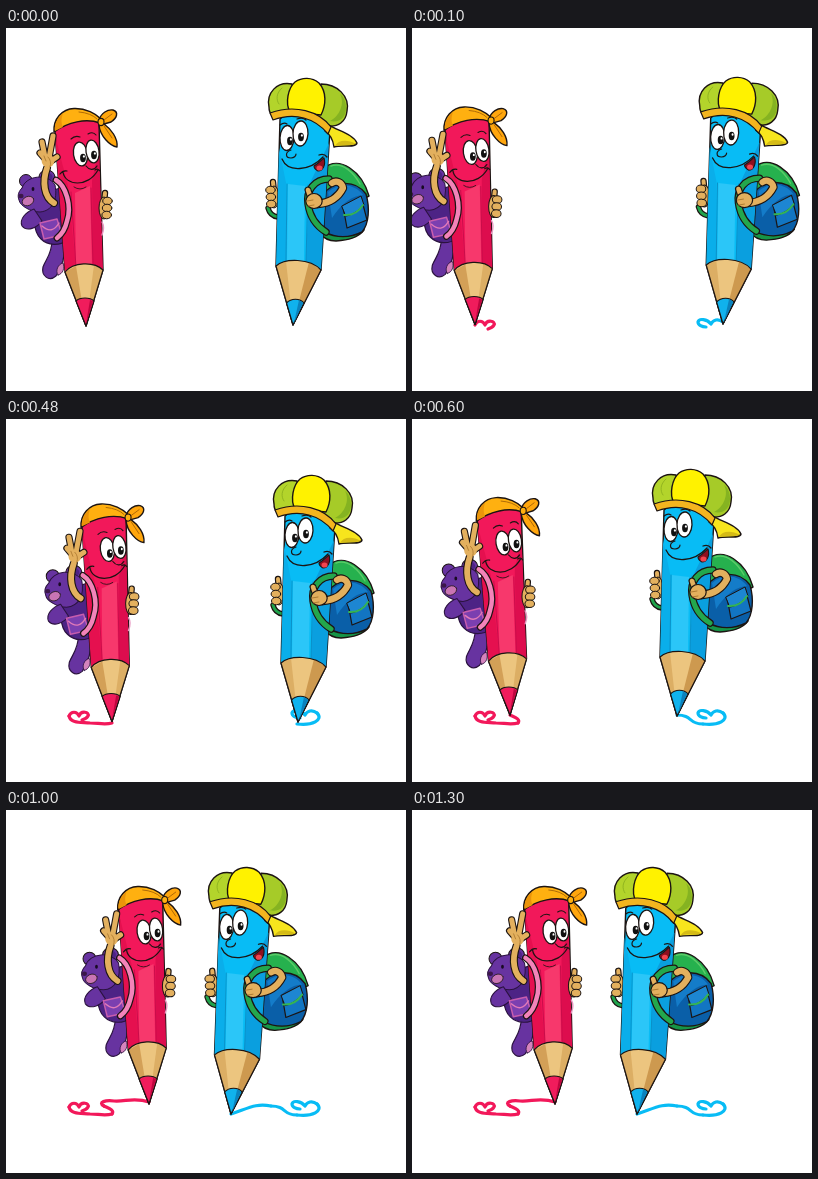
Recreate the animation shown at these times as an HTML page with a canvas. Size 400 by 363 pixels, loop 1500 ms.

```html
<!DOCTYPE html>
<html lang="en">
<head>
<meta charset="utf-8">
<title>Two pencils</title>
<style>
html, body { margin: 0; width: 100%; height: 100%; overflow: hidden; background: #fff; }
canvas { display: block; width: 400px; height: 363px; }
</style>
</head>
<body>
<canvas id="stage"></canvas>
<script>
const W = 400, H = 363, LOOP = 1500;
const canvas = document.getElementById('stage');
const ctx = canvas.getContext('2d');
const ratio = window.devicePixelRatio || 1;
canvas.width = W * ratio;
canvas.height = H * ratio;
ctx.lineCap = ctx.lineJoin = 'round';

const INK = '#1c1412', SKIN = '#e3b05e', SKIN_DARK = '#a9762d';
const PINK = '#f2185a', BLUE = '#08bcf5';

// start time, then dx, dy and tilt in degrees about the tip
const poses = [
  { at: 0, pink: [0, 0, 0], blue: [0, 0, 0] },
  { at: 100, pink: [-17, -1.5, 0.3], blue: [24, -1, 0.2] },
  { at: 300, pink: [26, 4.5, 0.3], blue: [5, 6, 0] },
  { at: 600, pink: [18, -2, -0.5], blue: [-22, 0, 0] },
  { at: 1000, pink: [63, -4, 0.2], blue: [-62, 7, 0.5] }
];

// one piece of line is added with every pose
const pinkTrail = [
  'M63 297C65 292 71 292 73 297C75 291 84 293 82 297C81 299 79 300 76 301',
  'M63 297C65 305 76 303 84 304C92 304 99 306 106 304',
  'M106 304C109 300 102 298 98 296',
  'M98 296C91 292 100 290 108 291C119 292 128 287 143 292'
];
const blueTrail = [
  'M311 294C306 290 301 292 299 296C295 291 287 290 286 294C286 297 290 299 294 299',
  'M311 294C318 301 306 307 291 305',
  'M291 305C276 305 281 296 265 296',
  'M265 296C250 293 243 298 225 304'
];

function shape(d, fill, line = 1.4, ink = INK) {
  const p = new Path2D(d);
  if (fill) { ctx.fillStyle = fill; ctx.fill(p); }
  if (line) { ctx.strokeStyle = ink; ctx.lineWidth = line; ctx.stroke(p); }
}

function line(d, width = 1.2, ink = INK) {
  shape(d, null, width, ink);
}

function oval(x, y, rx, ry, fill, width = 1.2, tilt = 0) {
  ctx.beginPath();
  ctx.ellipse(x, y, rx, ry, tilt, 0, Math.PI * 2);
  ctx.fillStyle = fill;
  ctx.fill();
  if (width) { ctx.strokeStyle = INK; ctx.lineWidth = width; ctx.stroke(); }
}

// outlined thick stroke
function limb(d, width, fill) {
  line(d, width + 2.4);
  line(d, width, fill);
}

function eye(x, y, rx, ry, px, py, tilt) {
  oval(x, y, rx, ry, '#fff', 1.3, tilt);
  oval(px, py, 2.9, 4.2, '#111', 0);
  oval(px + 0.9, py - 1.6, 1, 1.2, '#fff', 0);
}

// thumb-up fist, side = 1 or -1
function fist(x, y, side) {
  limb(`M${x - side * 2} ${y - 2}L${x - side} ${y - 12}`, 4, SKIN);
  oval(x - side * 2, y + 3, 5, 11, SKIN, 1);
  for (let i = 0; i < 3; i++) oval(x + side * (1.5 - i * 0.4), y - 4 + i * 7, 4.8, 3.8, SKIN, 1);
}

function teddy() {
  const fur = '#6733a0', dark = '#4d2385', ink = '#2b123f';
  shape('M46 212C46 226 40 231 37 239C35 248 43 254 50 248C55 241 59 229 60 212Z', fur, 1.2, ink);
  shape('M52 247C49 243 52 236 57 235C59 240 57 246 52 247Z', '#d583bd', 0.8, ink);
  shape('M30 168C26 184 27 204 35 211C42 218 54 218 61 212L60 158Z', dark, 1.2, ink);
  oval(20, 153, 6.5, 6.5, fur, 1);
  oval(41, 149, 8, 7, fur, 1);
  oval(42, 149, 4.5, 4, dark, 0);
  shape('M16 160C20 147 42 145 49 157C52 172 46 183 34 184C25 184 14 178 13 172C11 167 13 163 16 160Z', fur, 1, ink);
  shape('M28 181C20 184 13 191 16 198C21 204 31 200 36 193Z', fur, 1.1, ink);
  oval(22, 173, 6, 4.5, '#c974b4', 0.8, -0.4);
  oval(15, 168, 2.6, 2.2, '#3b1749', 0);
  oval(27, 161, 1.4, 2, '#180a22', 0);
  shape('M34 195L51 191L56 207L38 211Z', '#7b3fb0', 1.5, '#c85dae');
  line('M36 198Q46 207 53 195', 1.4, '#e27ab8');
}

function pinkPencil() {
  teddy();
  const wood = 'M59 244C67 234 88 233 97 242L80 298Z';
  shape('M49 104C52 92 88 88 93 95L97 242L80 298L59 244Z', PINK);
  shape('M49 107L62 158L70 240L59 244Z', '#e5104f', 0);
  shape('M69 165L84 158L86 238L70 240Z', '#f7386c', 0);
  shape('M86 153L93 120L97 242L87 238Z', '#dd0d4e', 0);
  line('M65 164L70 239M85 160L87 238', 0.8, '#c00a46');
  shape(wood, '#ecc57f', 0);
  shape('M59 244L70 238L80 298Z', '#d3a057', 0);
  shape('M88 237L97 242L80 298Z', '#dcae64', 0);
  line(wood);
  shape('M70 273C74 269 84 269 88 273L80 298Z', '#f01c5c', 1.2);
  shape('M84 272L87 273L80 296Z', '#bf063f', 0);

  line('M65 111Q69 107 74 109M82 106Q87 103 90 107', 1.1);
  eye(74.5, 126, 7, 12, 77, 130, -0.15);
  eye(86.5, 123.5, 6.5, 11.5, 88, 127, -0.15);
  line('M80 138C83 142 88 143 91 138', 1.2);
  line('M57 144C59 158 82 160 92 142M54 146Q57 142 61 143M89 142Q92 140 94 143', 1.2);
  line('M68 159Q74 163 80 159', 0.8);

  limb('M50 152C60 158 66 178 61 193C59 202 55 207 51 210', 4.5, '#f383b9');
  const arm = 'M48 175C38 169 36 154 41 140';
  const fingers = 'M43 130L47 108M39 129L36 114M41 133L34 125M45 133L51 129';
  line(arm, 8); line(fingers, 7.2);
  line(arm, 5.8, SKIN); line(fingers, 5, SKIN);
  oval(42, 133, 6.4, 6.4, SKIN, 0);
  line('M42 129Q46 133 44 139M38 128L40 133', 0.8, SKIN_DARK);

  line('M96 194Q99 199 96 207', 1.4, '#e795c0');
  fist(100, 177, 1);

  shape('M93 92C95 85 102 81 107 82C113 84 111 90 105 94L98 96C105 101 112 110 111 119C104 118 94 108 93 97Z', '#ffa60d');
  shape('M48 104C47 91 56 81 68 80.5C80 80 90 86 95 91L94 95C80 90 62 94 48 104Z', '#ffb010');
  shape('M49 103C48 96 52 89 57 85C55 91 55 95 57 99Z', '#eb940a', 0);
  oval(95, 94, 3, 3.6, '#ffb010', 1.1);
  line('M73 84Q85 85 91 91M98 92L106 86M98 98L106 110', 0.8, '#9c5b04');
}

function backpack() {
  shape('M310 184C306 200 316 213 330 213C342 212 352 210 358 202L350 170Z', '#169447');
  shape('M318 140C333 127 356 143 363 168L355 172L316 164Z', '#26b14e');
  shape('M316 168C326 152 349 151 360 166C364 180 363 196 356 204C344 210 330 210 318 204Z', '#0a5fa8');
  shape('M322 164C334 154 349 156 357 167C347 167 335 176 326 190Z', '#147cc9', 0);
  shape('M337 178L355 169L361 192L341 200Z', '#1275c2', 1.2);
  shape('M336 178L355 168L358 177C351 184 346 187 340 188Z', '#1d86d2', 1);
  line('M338 187Q350 188 357 177', 2, '#35b454');
  line('M325 138C337 134 348 145 354 156', 1.4, '#5ccb68');
}

function cap() {
  const lime = '#b3d42b';
  shape('M286 56C271 53 260 65 263 79C263 86 267 90 273 89L290 87Z', lime);
  shape('M315 56C331 56 344 68 341 83C340 94 332 99 322 98L306 86Z', '#a6cb28');
  shape('M334 66C339 75 334 88 324 93C334 95 340 89 340 80C340 74 338 69 334 66Z', '#85b321', 0);
  line('M276 60C270 65 270 72 273 76', 0.8, '#89ad1d');
  shape('M284 84C279 75 282 60 289 54C296 49 306 49 313 55C321 64 320 77 315 87Z', '#fff200');
  shape('M323 97C332 103 347 106 351 115C350 120 336 117 328 119C327 112 324 106 319 103Z', '#f7e51d');
  shape('M329 118C332 112 341 111 350 116C344 118 335 116 329 118Z', '#d5bb16', 0);
  shape('M264 85C289 76 313 83 325 99L322 106C309 90 289 84 267 92Z', '#f3b51f', 1.2);
}

function bluePencil() {
  backpack();
  limb('M262 180Q264 188 272 189', 3, '#20a34c');
  fist(266, 166, -1);

  const wood = 'M270 238C279 230 304 230 315 242L287 297Z';
  shape('M274 91C288 78 319 82 324 102L315 242L287 297L270 238Z', BLUE);
  shape('M273 120L280 155L280 235L270 238Z', '#0aaeea', 0);
  shape('M282 156L299 158L298 233L281 233Z', '#2bc6f8', 0);
  shape('M303 157L323 115L315 242L300 234Z', '#0a9fdf', 0);
  line('M281 156L280 234M302 157L300 233', 0.8, '#0c86bd');
  shape(wood, '#ecc57f', 0);
  shape('M270 238L280 233L287 297Z', '#dcae64', 0);
  shape('M303 234L315 242L287 297Z', '#cd994f', 0);
  line(wood);
  shape('M280.5 275C285 270 294 270 298 275L287 297Z', '#10b2ed', 1.2);
  shape('M293 272L297 275L288 295Z', '#0b82bd', 0);

  line('M274 97Q278 94 281 96M291 91Q297 89 300 92', 1.2);
  eye(281, 110, 7, 12.5, 284, 113, 0.05);
  eye(294.5, 105.5, 7.5, 12.5, 295, 109, 0.05);
  line('M285 122C279 124 279 130 285 130C288 130 290 128 290 126', 1.2);
  line('M276 131C282 145 304 143 317 129M313 127Q318 125 321 129', 1.3);
  shape('M308 138C313 135 316 131 318 130C320 137 317 143 312 143C310 142 308 140 308 138Z', '#8d1020', 1.1);
  oval(313.5, 140, 3, 2.6, '#f2444e', 0);

  limb('M323 151C308 151 300 163 302 176C304 190 312 199 320 204', 5, '#23a74d');
  const arm = 'M312 176C323 175 332 170 337 160C336 154 330 152 326 155';
  line(arm, 8.4); line(arm, 6.2, SKIN);
  limb('M305 171L302 162', 4.6, SKIN);
  oval(308, 173, 8.2, 7.5, SKIN, 1.2);
  line('M301 173L307 172M302 178L308 177', 0.9, SKIN_DARK);
  cap();
}

function place(draw, [dx, dy, tilt], x, y) {
  ctx.save();
  ctx.translate(x + dx, y + dy);
  ctx.rotate(tilt * Math.PI / 180);
  ctx.translate(-x, -y);
  draw();
  ctx.restore();
}

function render(time) {
  const t = time % LOOP;
  let step = poses.length - 1;
  while (step > 0 && poses[step].at > t) step--;
  ctx.setTransform(ratio, 0, 0, ratio, 0, 0);
  ctx.fillStyle = '#fff';
  ctx.fillRect(0, 0, W, H);
  for (let i = 0; i < step; i++) {
    line(pinkTrail[i], 3.2, PINK);
    line(blueTrail[i], 3.2, BLUE);
  }
  place(pinkPencil, poses[step].pink, 80, 298);
  place(bluePencil, poses[step].blue, 287, 297);
}

const start = performance.now();
function tick() {
  render(performance.now() - start);
  requestAnimationFrame(tick);
}
tick();
</script>
</body>
</html>
```
